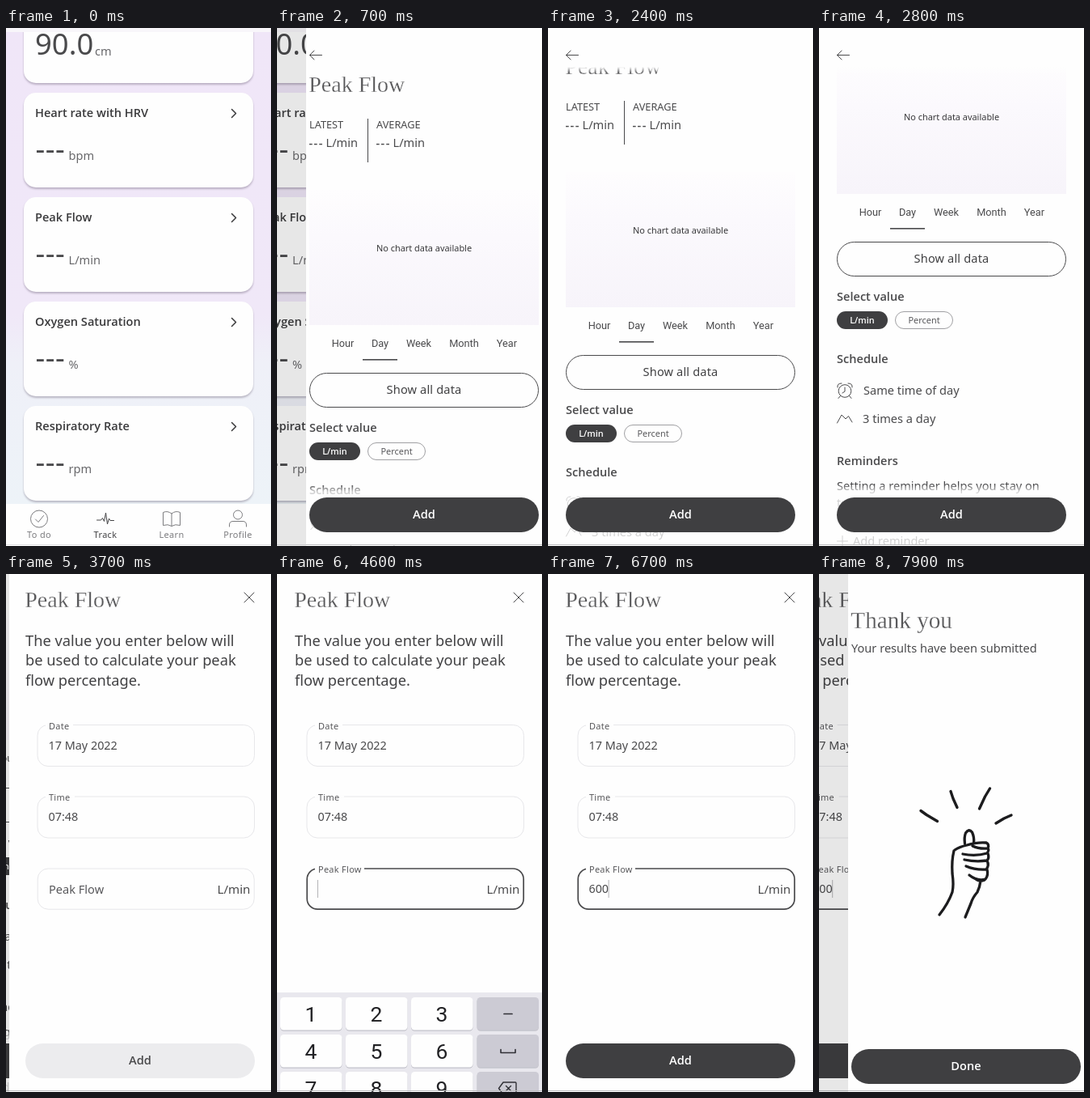
Write an HTML page that moves like this. It is 328 by 640 pixels and loops after 8000 ms.

```html
<!DOCTYPE html>
<html lang="en">
<head>
<meta charset="utf-8">
<title>Peak flow tracker</title>
<style>
html, body { margin: 0; width: 100%; height: 100%; overflow: hidden; background: #fefefe; }
#stage { position: relative; width: 328px; height: 640px; overflow: hidden; }
.page { position: absolute; inset: 0; overflow: hidden; background: #fefefe; }
.page svg { position: absolute; left: 0; top: 0; display: block; }
.dim { position: absolute; inset: 0; background: #000; opacity: 0; }
text { font-family: "Noto Sans", "Open Sans", sans-serif; white-space: pre; }
.b { font-family: "Open Sans", "Noto Sans", sans-serif; font-weight: 600; }
.s { font-family: "Liberation Serif", serif; stroke: #fefefe; stroke-width: .3px; }
.r { font-family: Roboto, sans-serif; }
.m { text-anchor: middle; }
.line { fill: none; stroke-linecap: round; stroke-linejoin: round; }
.card { filter: drop-shadow(0 2px 1.3px rgba(70, 60, 85, .32)); }
</style>
</head>
<body>
<div id="stage"></div>
<script>
const W = 328, H = 640, LOOP = 8000;
const INK = '#4a4a4c', DARK = '#3f3f41', BODY = 14.58, SMALL = 10.93;

const text = (x, y, s, size = BODY, fill = INK, cls = '', more = '') =>
  `<text x="${x}" y="${y}" font-size="${size}" fill="${fill}" class="${cls}" ${more}>${s}</text>`;
const rect = (x, y, w, h, r, fill, more = '') =>
  `<rect x="${x}" y="${y}" width="${w}" height="${h}" rx="${r}" fill="${fill}" ${more}/>`;
const line = (d, stroke = INK, width = 1, more = '') =>
  `<path class="line" d="${d}" stroke="${stroke}" stroke-width="${width}" ${more}/>`;
const fade = (id, y1, y2, stops) =>
  `<linearGradient id="${id}" gradientUnits="userSpaceOnUse" x1="0" x2="0" y1="${y1}" y2="${y2}">` +
  stops.map(([o, c, a = 1]) => `<stop offset="${o}" stop-color="${c}" stop-opacity="${a}"/>`).join('') +
  '</linearGradient>';
const title = (y, s, size = 28) => text(21.3, y, s, size, '#565658', 's');
const pill = (y, label, id = '') =>
  rect(22, y, 284, 43, 21.5, DARK, id && `id="${id}"`) +
  text(164, y + 26, label, BODY, '#fff', 'b m', id && `id="${id}Text"`);

function listPage() {
  const card = (y, name, unit) =>
    rect(22, y, 284, 117, 15, '#fefefe', 'class="card"') +
    text(36, y + 30, name, BODY, '#3a3a3c', 'b') +
    line(`M279.5 ${y + 20.5}l5 5-5 5`, '#3a3a3c', 1.5) +
    text(36.5, y + 81.8, '---', 36.4, INK, '', 'letter-spacing=".5"') +
    text(77.5, y + 83, unit, BODY, '#68686b');
  const names = [['Heart rate with HRV', 'bpm'], ['Peak Flow', 'L/min'],
    ['Oxygen Saturation', '%'], ['Respiratory Rate', 'rpm']];
  const tab = (x, s, on) => text(x, 630, s, SMALL, on ? '#444446' : '#7c7c7f', 'm', 'letter-spacing=".35"');
  const g = '#7c7c7f';
  return `<defs>${fade('back', 0, 590, [[0, '#f0e6f8'], [.6, '#f0e8f8'], [.7, '#eff0f8'], [1, '#edf3f8']])}</defs>` +
    rect(0, 0, W, H, 0, 'url(#back)') +
    rect(22, -49, 284, 117, 15, '#fefefe', 'class="card"') +
    text(36, 33.2, '90.0', 36.4) + text(110, 34, 'cm', BODY, '#68686b') +
    names.map(([n, u], i) => card(80 + i * 129, n, u)).join('') +
    rect(0, 0, W, 5, 0, '#f8f6fa') + rect(0, 588, W, 52, 0, '#fefefe') +
    `<circle cx="41" cy="606.5" r="10.5" fill="none" stroke="${g}"/>` + line('M36.5 607l3.5 3.5 6.500-8', g) +
    line('M112.5 608h5l2-2.5 2 4 2-10.5 2 14 2-7 1.5 2.5h4.5', '#444446') +
    line('M205 600q-5-4-10.5-1.5v16q6-2 10.5 1q4.5-3 10.5-1v-16q-5.5-2.5-10.5 1.5v15', g) +
    `<circle cx="287" cy="601.5" r="5.5" fill="none" stroke="${g}"/>` + line('M276.5 616v-2q0-4.5 4.5-4.5h12q4.5 0 4.5 4.5v2', g) +
    tab(41, 'To do') + tab(123, 'Track', true) + tab(205, 'Learn') + tab(287, 'Profile');
}

function detailPage() {
  const stat = (x, name) =>
    text(x, 123.5, name, 12.76) +
    text(x - .5, 147, '---', BODY, INK, 'b', 'letter-spacing="1.4"') + text(x + 20.5, 147, 'L/min');
  const tabs = [['Hour', 63.5], ['Day', 109.5], ['Week', 157.5], ['Month', 213.5], ['Year', 266.5]];
  const head = (y, s) => text(22, y, s, BODY, INK, 'b');
  return '<defs>' +
    fade('chart', 200, 367, [[0, '#fefdfe'], [.35, '#fbf9fd'], [1, '#f7f4fa']]) +
    fade('top', 48, 56, [[0, '#fefefe'], [1, '#fefefe', 0]]) +
    fade('foot', 564, 573, [[0, '#fefefe', 0], [1, '#fefefe', .75]]) + '</defs>' +
    '<g id="scroll">' + title(79, 'Peak Flow') +
    stat(22, 'LATEST') + stat(105, 'AVERAGE') + rect(94, 112, 1, 54, 0, INK) +
    rect(22, 200, 284, 167, 0, 'url(#chart)') +
    text(164, 276, 'No chart data available', SMALL, '#38383a', 'm') +
    tabs.map(([s, x]) => text(x, 394, s, 12.76, INK, 'r m')).join('') +
    rect(88, 409, 43, 1.6, 0, INK) +
    rect(22.5, 426.5, 283, 42, 21, '#fefefe', `stroke="${INK}"`) +
    text(164, 452, 'Show all data', BODY, '#404042', 'm', 'letter-spacing=".15"') +
    head(499, 'Select value') +
    rect(22, 512, 63, 22, 11, DARK) + text(53.5, 527, 'L/min', SMALL, '#fff', 'b m') +
    rect(94.5, 512.5, 71, 21, 10.5, '#fefefe', 'stroke="#a0a0a3"') +
    text(130, 527, 'Percent', SMALL, '#58585b', 'm') +
    head(576, 'Schedule') +
    `<circle cx="32" cy="610.5" r="7.8" fill="none" stroke="${INK}"/>` +
    line('M32 606v5l-3 2M26.5 616.5l-2.5 3M37.5 616.5l2.5 3M23 606q-1-5 5-5M41 606q1-5-5-5') +
    text(55, 615, 'Same time of day') +
    line('M22.5 650l5.5-10 5 5 3.5-3.5 4.5 7.5') + text(54, 650, '3 times a day') +
    head(702, 'Reminders') +
    text(22, 733, 'Setting a reminder helps you stay on') + text(22, 754, 'track.') +
    line('M22.5 796h13M29 789.5v13') + text(42, 801, 'Add reminder') + '</g>' +
    rect(0, 0, W, 48, 0, '#fefefe') + rect(0, 48, W, 8, 0, 'url(#top)') +
    line('M37.5 33.5h-15M28 28l-5.5 5.5 5.5 5.5') +
    rect(0, 564, W, 76, 0, 'url(#foot)') + pill(580, 'Add');
}

function keyboard() {
  const xs = [4, 85, 166, 247.5], ys = [455, 501, 547, 593];
  const keys = ['123', '456', '789', ',0.'];
  const key = (x, y, fill, id = '') =>
    rect(x, y + 1.2, 76.5, 40.5, 4.5, '#c4c3cb') + rect(x, y, 76.5, 40.5, 4.5, fill, id);
  let out = rect(0, 449, W, 191, 0, '#e9e8ee');
  ys.forEach((y, r) => {
    [...keys[r]].forEach((k, c) => {
      out += key(xs[c], y, '#fefefe', k === '0' ? 'id="zero"' : '') +
        text(xs[c] + 38, y + 29.6, k, 26.5, '#222225', 'r m');
    });
    out += key(xs[3], y, r < 3 ? '#cccbd4' : '#2070de');
  });
  return out + line('M281 475.5h10', '#303036', 1.7, 'stroke-linecap="butt"') +
    line('M277 519.5v4h18v-4', '#303036', 1.6) +
    line('M280 560h15q1 0 1 1v13q0 1-1 1h-15l-5.5-7.5zM283.5 564.5l6 6M289.5 564.5l-6 6', '#303036', 1.4) +
    line('M279 613.5l4.5 4.5 9.5-10', '#fff', 1.7);
}

function formPage() {
  const field = (y, name, value, gap) =>
    rect(37, y + .5, 268.5, 51, 13, 'none', 'stroke="#e7e7ea"') + rect(47, y - 1, gap, 3, 0, '#fefefe') +
    text(51, y + 5.5, name, SMALL, '#58585b', '', 'letter-spacing=".3"') + text(50.5, y + 30.5, value, 14.4);
  const lines = ['The value you enter below will', 'be used to calculate your peak', 'flow percentage.'];
  return title(40.5, 'Peak Flow') + line('M293 23l12 12M305 23l-12 12') +
    lines.map((s, i) => text(22, 88.5 + i * 24.8, s, 18.25, '#424244')).join('') +
    field(186, 'Date', '17 May 2022', 34) + field(274.5, 'Time', '07:48', 36) +
    rect(37.2, 364, 268, 50.2, 13, 'none', 'id="box"') +
    rect(47, 361, 61, 6, 0, '#fefefe', 'id="gap"') +
    text(51, 395, 'Peak Flow', BODY, '#58585b', '', 'id="label"') +
    text(50.5, 393.5, '', 14.3, INK, '', 'id="value"') +
    rect(74, 378, 1, 22, 0, '#b4b4b7', 'id="caret"') +
    text(259.5, 395, 'L/min', 15.1) + pill(580, 'Add', 'add') + `<g id="keys">${keyboard()}</g>`;
}

function thanksPage() {
  const rays = 'M108 292.5l7 5 13.500 8M145 268.5l3 9 5 11M193.500 265l-6 10-7 15M220 298l-9 4-10 6';
  const thumb = 'M162.5 333q-1-8 1-13q4-6 8-1q3 7 2 13';
  const fingers = 'M150 341q6-4 15-6q13-4 24-3q4 2 2 7q-11 1-19-3' +
    'M160 346q16 3 30-1q3-4 1-6M191 345q2 6-1 9q-14 2-28-1M190 354q3 6-1 11q-13 1-25-4' +
    'M190 365q2 7-2 12q-10 3-20-5M187 378q-6 3-11-1';
  const arm = 'M149 342q-3 12-2 28q2 14 0 23q-5 14-16 28M182 379q-1 8-4 14q-6 7-8 14l-7 17';
  return title(67, 'Thank you', 29.2) + text(22, 96.5, 'Your results have been submitted') +
    line(rays, '#1c1c1e', 3.4) + line(thumb + fingers + arm, '#1c1c1e', 3.3) + pill(587, 'Done');
}

const stage = document.getElementById('stage');
const pages = [listPage, detailPage, formPage, thanksPage].map((make, i) => {
  const el = document.createElement('div');
  el.className = 'page';
  el.innerHTML = `<svg width="${W}" height="${H}" viewBox="0 0 ${W} ${H}">${make()}` +
    rect(0, 638, W, 1, 0, i ? '#bdbdbf' : '#e0e0e2') + '</svg><div class="dim"></div>';
  stage.append(el);
  return { el, art: el.firstChild, dim: el.lastChild };
});
const $ = id => document.getElementById(id);
const set = (id, attrs) => Object.entries(attrs).forEach(([k, v]) => $(id).setAttribute(k, v));

// One value per 100 ms tick; holds the last one.
const track = (t, start, before, values) =>
  t < start ? before : values[Math.min(values.length - 1, Math.floor((t - start) / 100))];

const ENTER = [0, 500, 3300, 7700];
const SLIDE = [300, 130, 36, 12, 4, 0];
const edgeAt = (i, t) => i > 3 ? W : i ? track(t, ENTER[i], W, SLIDE) : 0;

function drawPages(t) {
  pages.forEach((p, i) => {
    const edge = edgeAt(i, t), next = edgeAt(i + 1, t), cover = 1 - next / W;
    p.el.style.visibility = edge < W && next > 0 ? 'visible' : 'hidden';
    p.el.style.transform = `translateX(${edge}px)`;
    p.art.style.transform = `translateX(${-edge / 2 - W * .2 * cover}px)`;
    p.dim.style.opacity = .1 * cover;
  });
}

function drawForm(t) {
  const lift = track(t, 4400, 0, [.4, 1]), focus = t >= 4400;
  set('box', { stroke: focus ? INK : '#e7e7ea', 'stroke-width': focus ? 1.7 : 1 });
  set('gap', { opacity: lift === 1 ? 1 : 0 });
  set('label', { y: 395 - 26.5 * lift, 'font-size': BODY + (SMALL - BODY) * lift, 'letter-spacing': .3 * lift });

  const value = '600'.slice(0, t < 5100 ? 0 : t < 5500 ? 1 : t < 5600 ? 2 : 3);
  $('value').textContent = value;
  const on = focus && (t < 6200 || Math.floor((t - 6200) / 500) % 2 === 1);
  set('caret', { x: 50 + value.length * 8.2, opacity: on ? 1 : 0 });
  set('zero', { fill: t >= 5500 && t < 5700 ? '#d9d8df' : '#fefefe' });

  const down = t < 6200 ? track(t, 4400, 192, [192, 130, 68, 26, 7, 0]) : track(t, 6200, 0, [70, 150, 192]);
  set('keys', { transform: `translate(0 ${down})` });
  const ready = value.length > 0;
  const press = track(t, 7100, DARK, ['#48484a', '#515153', '#4d4d4f', '#48484a', '#434345', DARK]);
  set('add', { fill: ready ? press : '#ececee' });
  set('addText', { fill: ready ? '#fff' : INK });
}

function draw(now) {
  const t = Math.floor(now % LOOP / 100) * 100;
  drawPages(t);
  set('scroll', { transform: `translate(0 ${-track(t, 2400, 0, [22, 70, 118, 148, 162])})` });
  drawForm(t);
}

const begin = performance.now();
function tick() {
  draw(performance.now() - begin);
  requestAnimationFrame(tick);
}
tick();
</script>
</body>
</html>
```
